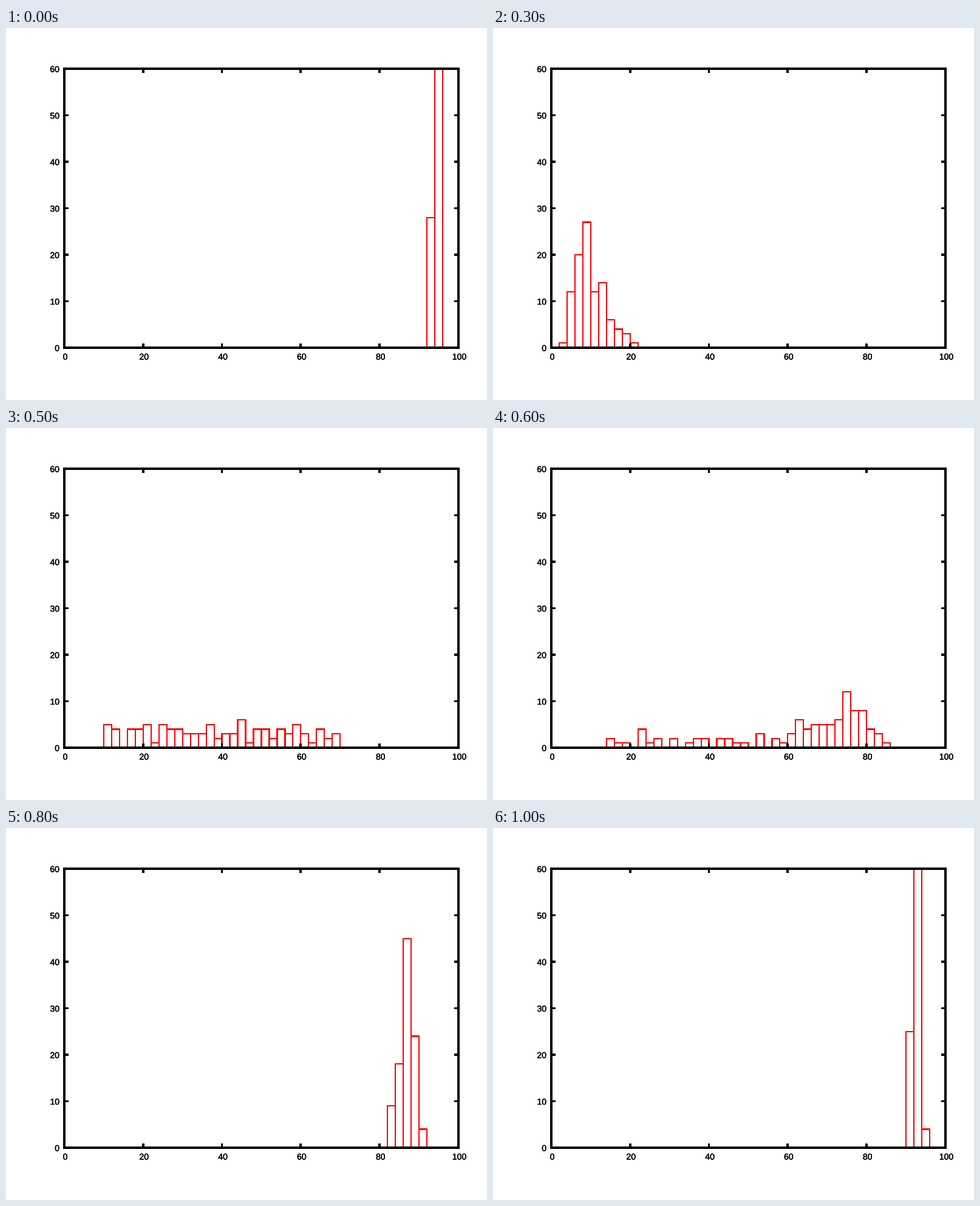
A matplotlib script that plays this animation: 792 by 612 pixels, repeating every 1100 ms.

```python
import numpy as np
import matplotlib.pyplot as plt
from matplotlib.animation import FuncAnimation
from matplotlib.collections import PolyCollection
from matplotlib.patheffects import withStroke

W, H, DPI = 792, 612, 72
LEFT, RIGHT, TOP, BOTTOM = 96, 744.95, 67.03, 526.03
BIN, YMAX = 2, 60
PEN, BORDER, TICK = 1.2, 2.76, 6.3

STEPS, COUNT = 11, 100
EDGES = np.arange(0, 100 + BIN, BIN)

# a population on its way from small to large, outlined by a few quantiles
LEVELS = [0, 0.1, 0.3, 0.6, 0.9, 1]
KEYS = {
    0: [92.1, 92.7, 94.14, 94.6, 95.4, 95.9],
    1: [3.58, 4.28, 5.66, 7.85, 10.34, 16],
    3: [3.82, 5.65, 7.76, 10.08, 14.6, 20.5],
    5: [9, 16, 27, 44.3, 62, 69.9],
    6: [14, 28, 60.5, 72.8, 78.4, 83.6],
    8: [82.3, 84.15, 86.3, 87.4, 88.9, 90.73],
    10: [90.3, 91, 92.35, 93, 93.6, 94.26],
}


def quantiles(step):
    """Quantiles at a step, growing logistically between the keys."""
    q = np.array(list(KEYS.values()))
    z = np.log(q / (100 - q))
    now = np.array([np.interp(step, list(KEYS), col) for col in z.T])
    return 100 / (1 + np.exp(-now))


def histogram(step):
    q = quantiles(step)
    x = np.interp((np.arange(COUNT) + 0.5) / COUNT, LEVELS, q)
    # a wide population is more ragged than a narrow one
    scatter = (q[-1] - q[0]) ** 2 / 2500
    x += np.random.default_rng(step).uniform(-scatter, scatter, COUNT)
    return np.histogram(x, EDGES)[0]


def px(x):
    return LEFT + x * (RIGHT - LEFT) / 100


def py(y):
    return BOTTOM - y * (BOTTOM - TOP) / YMAX


def box(x0, y0, x1, y1):
    """Rectangle grown to every pixel it touches."""
    x0, y0 = np.floor([x0, y0])
    x1, y1 = np.ceil([x1, y1])
    return [(x0, y0), (x1, y0), (x1, y1), (x0, y1)]


def hline(x0, x1, y, w):
    return box(x0, y - w / 2, x1, y + w / 2)


def vline(x, y0, y1, w):
    return box(x - w / 2, y0, x + w / 2, y1)


def bars(counts):
    out = []
    for x, n in zip(EDGES, counts):
        if n:
            a, b, y = px(x), px(x + BIN), py(min(n, YMAX))
            out += [vline(a, y, BOTTOM, PEN), vline(b, y, BOTTOM, PEN),
                    hline(a - PEN / 2, b + PEN / 2, y, PEN)]
    return out


plt.rcParams.update({"font.family": "Liberation Sans", "font.size": 14})
fig = plt.figure(figsize=(W / DPI, H / DPI), dpi=DPI, facecolor="white")
ax = fig.add_axes([0, 0, 1, 1])
ax.set(xlim=(0, W), ylim=(H, 0))
ax.axis("off")


def layer(polys, color, z):
    return ax.add_collection(
        PolyCollection(polys, facecolors=color, edgecolors="none",
                       linewidths=0, antialiaseds=False, zorder=z),
        autolim=False)


def label(x, y, value, ha):
    ax.text(x, y, str(value), ha=ha, va="baseline", color="black",
            path_effects=[withStroke(linewidth=0.4, foreground="black")])


half = BORDER / 2
frame = [hline(LEFT - half, RIGHT + half, y, BORDER) for y in (TOP, BOTTOM)]
frame += [vline(x, TOP, BOTTOM, BORDER) for x in (LEFT, RIGHT)]
for v in range(0, 101, 20):
    label(px(v) + 1.5, 545.5, v, "center")
    if 0 < v < 100:
        frame += [vline(px(v), TOP, TOP + TICK, BORDER),
                  vline(px(v), BOTTOM - TICK, BOTTOM, BORDER)]
for v in range(0, YMAX + 1, 10):
    label(88, py(v) + 5.5, v, "right")
    if 0 < v < YMAX:
        frame += [hline(LEFT, LEFT + TICK, py(v), BORDER),
                  hline(RIGHT - TICK, RIGHT, py(v), BORDER)]

red = layer([], "#ff0000", 1)
layer(frame, "black", 2)


def update(step):
    red.set_verts(bars(histogram(step)))
    return [red]


anim = FuncAnimation(fig, update, frames=STEPS, interval=100,
                     repeat=True, repeat_delay=0, blit=False)
plt.show()
```
